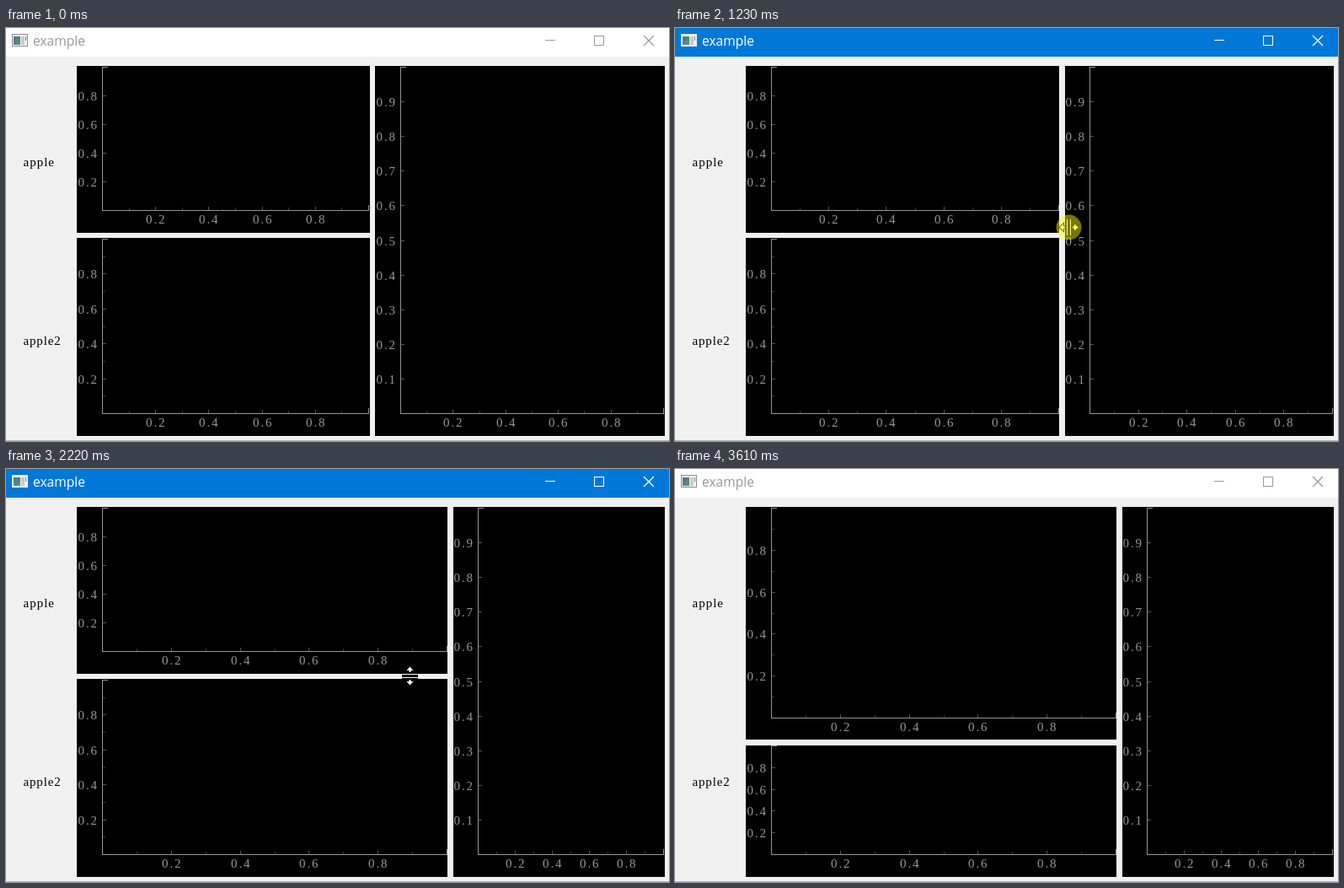
An HTML page with a canvas for the animation above (3.69 s loop, 787x490 px).

```html
<!DOCTYPE html>
<html lang="en">
<head>
<meta charset="utf-8">
<title>example</title>
<style>
html, body { margin: 0; width: 100%; height: 100%; overflow: hidden; background: #f0f0f0; }
canvas { display: block; }
</style>
</head>
<body>
<canvas id="stage" width="787" height="490"></canvas>
<script>
const ctx = document.getElementById('stage').getContext('2d');
const LOOP = 3690, STEP = 41.5;
const SERIF = '15px "Liberation Serif", "Noto Serif", serif';
const SANS = '15.6px "Open Sans", "Noto Sans", sans-serif';
const FACE = '#f0f0f0', AXIS = '#969696', MAJOR = '#545454', MINOR = '#383838';

// pointer legs: start, end, x and y reached
const START = [623, 441];
const legs = [
  [280, 640, 411, 246],
  [640, 770, 437, 236],
  [1060, 1520, 529, 235],
  [1600, 1700, 514, 221],
  [1700, 1890, 492, 248],
  [2090, 2220, 479, 245],
  [2328, 2775, 469, 327],
  [2862, 3065, 570, 377],
  [3072, 3110, 621, 405],
  [3150, 3360, 735, 500]
];

const mix = (a, b, p) => a + (b - a) * p;
const part = (t, a, b) => Math.min(1, Math.max(0, (t - a) / (b - a)));
const smooth = p => p * p * (3 - 2 * p);
const glide = (from, to, t, a, b) => Math.round(mix(from, to, smooth(part(t, a, b))));

// the screen refreshes in even steps, counted from the start of each leg
function snap(t) {
  let start = 0;
  for (const [a] of legs) if (t >= a) start = a;
  return start + Math.floor((t - start) / STEP) * STEP;
}

function pointerAt(t) {
  let [x, y] = START;
  for (const [a, b, tx, ty] of legs) {
    const p = part(t, a, b), e = (p + smooth(p)) / 2;
    x = mix(x, tx, e);
    y = mix(y, ty, e);
  }
  return [Math.round(x), Math.round(y)];
}

function box(color, x, y, w, h) {
  ctx.fillStyle = color;
  ctx.fillRect(x, y, w, h);
}

function text(str, x, y, color, font, gap) {
  ctx.font = font;
  ctx.letterSpacing = gap + 'px';
  ctx.fillStyle = color;
  ctx.fillText(str, x, y);
}

// white shape with a black rim
function shape(points) {
  ctx.beginPath();
  points.forEach(([x, y]) => ctx.lineTo(x, y));
  ctx.closePath();
  ctx.strokeStyle = '#000';
  ctx.lineWidth = 2;
  ctx.stroke();
  ctx.fillStyle = '#fff';
  ctx.fill();
}

function plot(left, top, right, bottom, fine) {
  box('#000', left, top, right - left, bottom - top);
  const x0 = left + 30, y0 = bottom - 27, x1 = right - 2, y1 = top + 1;
  const w = x1 - x0, h = y0 - y1;
  for (let i = 1; i < 10; i++) {
    const x = Math.round(x0 + w * i / 10), y = Math.round(y0 - h * i / 10);
    const even = i % 2 === 0, label = '0.' + i;
    if (even) {
      box(MAJOR, x, y0 - 4, 1, 4);
      text(label, x - 11, y0 + 16, AXIS, SERIF, 1.875);
    } else {
      box(MINOR, x, y0 - 3, 1, 3);
    }
    if (even || fine) {
      box(MAJOR, x0, y, 5, 1);
      text(label, left + 1.5, y + 6, AXIS, SERIF, 1.875);
    } else if (h > 190) {
      box(MINOR, x0, y, 4, 1);
    }
  }
  box(AXIS, x0, y1, 1, h + 1);
  box(AXIS, x0, y0, w + 1, 1);
  box(AXIS, x0, y1, 7, 1);
  box(AXIS, x1, y0 - 6, 1, 6);
}

// a dragged handle overlaps the plots on both sides by one pixel
function plots(x, y) {
  const padX = x > 440 ? 1 : 0, padY = y > 243 ? 1 : 0;
  plot(84, 45, x + padX, y + padY, false);
  plot(84, y + 6 - padY + padY, x + padX, 484, false);
  plot(x + 6, 45, 782, 484, true);
  box(FACE, 84, y, x + padX - 84, 6 + padY);
  box(FACE, x, 45, 6 + padX, 439);
}

function titleBar(active) {
  const ink = active ? '#fff' : '#999';
  box(active ? '#0078d7' : '#fff', 0, 0, 787, 34);

  box(active ? '#e8eef2' : '#8b8b8b', 7, 7, 19, 15);
  box('#f4f4f4', 8, 8, 17, 13);
  const pane = ctx.createLinearGradient(9, 10, 17, 20);
  pane.addColorStop(0, '#4a7390');
  pane.addColorStop(1, '#5f947c');
  ctx.fillStyle = pane;
  ctx.fillRect(9, 10, 8, 10);
  box('#c8cccc', 18, 10, 4, 10);
  box('#7a8888', 23, 10, 1, 5);

  text('example', 32, 21, ink, SANS, 0);

  box(ink, 640, 14, 12, 1);
  ctx.strokeStyle = ink;
  ctx.lineWidth = 1;
  ctx.strokeRect(698.5, 9.5, 11, 11);
  ctx.lineWidth = 1.3;
  ctx.beginPath();
  for (const s of [-6, 6]) {
    ctx.moveTo(763 - s, 9);
    ctx.lineTo(763 + s, 21);
  }
  ctx.stroke();
}

function splitCursor(x, y, turned) {
  ctx.save();
  ctx.translate(x + 0.5, y + 0.5);
  if (turned) ctx.rotate(Math.PI / 2);
  box('#000', -3.5, -9.5, 7, 19);
  for (const s of [-1, 1]) {
    box('#fff', s * 2 - 0.5, -9.5, 1, 19);
    shape([[4.5, -1], [6.5, -1], [6.5, -4], [11, 0], [6.5, 4], [6.5, 1], [4.5, 1]]
      .map(([a, b]) => [a * s, b]));
  }
  ctx.restore();
}

function arrow(x, y) {
  shape([[0, 0], [0, 16.5], [4, 13], [6.5, 18.5], [9, 17.5], [6.5, 12], [11.5, 11.5]]
    .map(([a, b]) => [x + a + 0.5, y + b + 0.5]));
}

function drawPointer(t) {
  if (t < 280 || t >= 3340) return;
  const [x, y] = pointerAt(t);
  if (t > 680 && t < 1600) splitCursor(x, y, false);
  else if (t > 1820 && t < 2900) splitCursor(x, y, true);
  else arrow(x, y);

  const pressed = (t >= 1060 && t < 1516) || (t >= 2328 && t < 2862);
  if (pressed) {
    ctx.fillStyle = 'rgba(255,255,0,0.47)';
    ctx.beginPath();
    ctx.arc(x + 0.5, y + 0.5, 15, 0, Math.PI * 2);
    ctx.fill();
  }
}

function draw(t) {
  const s = snap(t);
  box(FACE, 0, 0, 787, 490);
  titleBar(t >= 1060 && t < 3610);
  text('apple', 20.5, 164, '#000', SERIF, 1);
  text('apple2', 20.5, 376, '#000', SERIF, 0.85);
  plots(glide(432, 524, s, 1074, 1529), glide(243, 321, s, 2340, 2797));
  box('#b4b4b4', 0, 489, 787, 1);
  drawPointer(s);
}

function tick() {
  draw(performance.now() % LOOP);
  requestAnimationFrame(tick);
}
tick();
</script>
</body>
</html>
```
